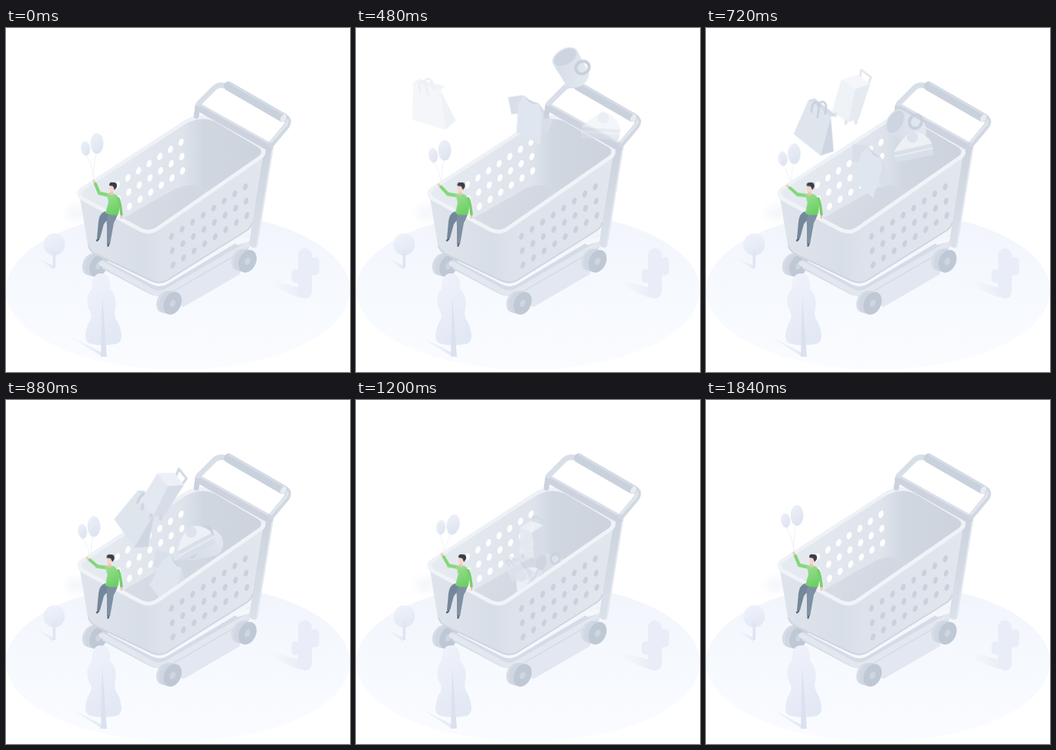
An HTML page for the animation above (1920 ms loop, 450 by 450 pixels).

```html
<!DOCTYPE html>
<html lang="en">
<head>
<meta charset="utf-8">
<title>Shopping cart</title>
<style>
html, body { margin: 0; width: 100%; height: 100%; overflow: hidden; background: #fff; }
svg { display: block; width: 100vw; height: 100vh; }

/* The picture advances once every 80 ms: 24 poses per loop. */
.move { animation: 1920ms infinite; }
.item { opacity: 0; }
#shirt { animation-name: shirt; }
#mug { animation-name: mug; }
#cake { animation-name: cake; }
#bag { animation-name: bag; }
#case { animation-name: case; }
#balloons { animation-name: balloons; transform-origin: 119px 151px; }
#torso { animation-name: lean; transform-origin: 140px 244px; }
#forearm { animation-name: forearm; transform-origin: 122px 216px; }

@keyframes shirt {
  0% { opacity: 0; transform: translate(266px, 36px) rotate(-16deg); animation-timing-function: steps(1); }
  4.166% { opacity: 0; transform: translate(266px, 36px) rotate(-16deg); animation-timing-function: steps(3); }
  16.666% { opacity: .85; transform: translate(245px, 83px) rotate(-6deg); animation-timing-function: steps(2); }
  25% { opacity: 1; transform: translate(227px, 120px) rotate(4deg); animation-timing-function: steps(2); }
  33.333% { opacity: 1; transform: translate(214px, 164px) rotate(12deg); animation-timing-function: steps(3); }
  45.833% { opacity: .95; transform: translate(210px, 234px) rotate(28deg); animation-timing-function: steps(4); }
  62.5%, 100% { opacity: 0; transform: translate(202px, 262px) rotate(34deg) scale(.7); }
}
@keyframes mug {
  0% { opacity: 0; transform: translate(338px, -34px) rotate(0deg); animation-timing-function: steps(2); }
  8.333% { opacity: .5; transform: translate(338px, -34px) rotate(0deg); animation-timing-function: steps(2); }
  16.666% { opacity: .65; transform: translate(312px, 14px) rotate(-14deg); animation-timing-function: steps(2); }
  25% { opacity: 1; transform: translate(282px, 53px) rotate(-30deg); animation-timing-function: steps(2); }
  33.333% { opacity: 1; transform: translate(265px, 102px) rotate(-42deg); animation-timing-function: steps(3); }
  45.833% { opacity: 1; transform: translate(258px, 189px) rotate(-100deg); animation-timing-function: steps(4); }
  62.5% { opacity: .75; transform: translate(254px, 216px) rotate(-76deg) scale(.75); animation-timing-function: steps(3); }
  75%, 100% { opacity: 0; transform: translate(250px, 236px) rotate(-70deg) scale(.6); }
}
@keyframes cake {
  0% { opacity: 0; transform: translate(366px, 152px) rotate(12deg); animation-timing-function: steps(3); }
  12.5% { opacity: 0; transform: translate(366px, 152px) rotate(12deg); animation-timing-function: steps(1); }
  16.666% { opacity: .12; transform: translate(349px, 143px) rotate(10deg); animation-timing-function: steps(2); }
  25% { opacity: .6; transform: translate(321px, 129px) rotate(8deg); animation-timing-function: steps(2); }
  33.333% { opacity: 1; transform: translate(283px, 140px) rotate(0deg); animation-timing-function: steps(3); }
  45.833% { opacity: 1; transform: translate(246px, 184px) rotate(-24deg); animation-timing-function: steps(4); }
  62.5% { opacity: .9; transform: translate(224px, 238px) rotate(-52deg) scale(.9); animation-timing-function: steps(4); }
  79.166%, 100% { opacity: 0; transform: translate(218px, 262px) rotate(-60deg) scale(.7); }
}
@keyframes bag {
  0% { opacity: 0; transform: translate(82px, 92px) rotate(-20deg); animation-timing-function: steps(5); }
  20.833% { opacity: 0; transform: translate(82px, 92px) rotate(-20deg); animation-timing-function: steps(1); }
  25% { opacity: .35; transform: translate(97px, 102px) rotate(-14deg); animation-timing-function: steps(2); }
  33.333% { opacity: 1; transform: translate(129px, 118px); animation-timing-function: steps(3); }
  45.833% { opacity: 1; transform: translate(171px, 156px) rotate(24deg); animation-timing-function: steps(4); }
  62.5% { opacity: .6; transform: translate(211px, 223px) rotate(-38deg) scale(.55); animation-timing-function: steps(4); }
  79.166%, 100% { opacity: 0; transform: translate(214px, 250px) rotate(-44deg) scale(.5); }
}
@keyframes case {
  0% { opacity: 0; transform: translate(170px, 58px) rotate(-8deg); animation-timing-function: steps(7); }
  29.166% { opacity: 0; transform: translate(170px, 58px) rotate(-8deg); animation-timing-function: steps(1); }
  33.333% { opacity: .4; transform: translate(183px, 80px); animation-timing-function: steps(3); }
  45.833% { opacity: 1; transform: translate(203px, 126px) rotate(22deg); animation-timing-function: steps(4); }
  62.5% { opacity: .9; transform: translate(230px, 186px) rotate(-8deg) scale(.8); animation-timing-function: steps(5); }
  83.333%, 100% { opacity: 0; transform: translate(226px, 238px) rotate(-22deg) scale(.6); }
}
@keyframes balloons {
  0% { transform: translate(0, 0); animation-timing-function: steps(4); }
  16.666% { transform: translate(-2px, 4px); animation-timing-function: steps(2); }
  25% { transform: translate(-3px, 9px); animation-timing-function: steps(2); }
  33.333% { transform: translate(-3.5px, 13px); animation-timing-function: steps(3); }
  45.833% { transform: translate(-4px, 14.5px); animation-timing-function: steps(4); }
  62.5% { transform: translate(8px, 12px) rotate(11deg); animation-timing-function: steps(6); }
  87.5% { transform: translate(1px, 1px) rotate(1deg); animation-timing-function: steps(2); }
  95.833%, 100% { transform: translate(0, 0); }
}
@keyframes lean {
  0% { transform: rotate(0deg); animation-timing-function: steps(8); }
  33.333% { transform: rotate(-5deg); animation-timing-function: steps(3); }
  45.833% { transform: rotate(-5deg); animation-timing-function: steps(4); }
  62.5% { transform: rotate(-1.500deg); animation-timing-function: steps(6); }
  87.5%, 100% { transform: rotate(0deg); }
}
@keyframes forearm {
  0% { transform: rotate(0deg); animation-timing-function: steps(4); }
  16.666% { transform: rotate(-9deg); animation-timing-function: steps(2); }
  25% { transform: rotate(-17deg); animation-timing-function: steps(2); }
  33.333% { transform: rotate(-21deg); animation-timing-function: steps(3); }
  45.833% { transform: rotate(-22deg); animation-timing-function: steps(4); }
  62.5% { transform: rotate(-6deg); animation-timing-function: steps(6); }
  87.5% { transform: rotate(-1deg); animation-timing-function: steps(2); }
  95.833%, 100% { transform: rotate(0deg); }
}
</style>
</head>
<body>
<svg viewBox="0 0 450 450" fill="none" stroke-linecap="round" stroke-linejoin="round">
  <defs>
    <linearGradient id="ground" x2="0" y2="1">
      <stop stop-color="#f1f4fb"/><stop offset=".5" stop-color="#f6f9fe"/><stop offset="1" stop-color="#fafcff"/>
    </linearGradient>
    <linearGradient id="leaf" x1="0" x2=".4" y2="1">
      <stop stop-color="#f0f3fb"/><stop offset="1" stop-color="#e3e8f5"/>
    </linearGradient>
    <linearGradient id="inside" gradientUnits="userSpaceOnUse" x1="97" x2="338">
      <stop stop-color="#e6ebf2"/><stop offset=".55" stop-color="#dfe4ec"/>
      <stop offset=".67" stop-color="#d0d7e1"/><stop offset="1" stop-color="#ccd3dd"/>
    </linearGradient>
    <linearGradient id="floor" x1="0" x2="1" y2=".3">
      <stop stop-color="#dadfe7"/><stop offset=".6" stop-color="#d2d8e1"/><stop offset="1" stop-color="#d3dae3"/>
    </linearGradient>
    <linearGradient id="outside" gradientUnits="userSpaceOnUse" x1="97" x2="338">
      <stop stop-color="#dfe4ec"/><stop offset=".33" stop-color="#d8dee7"/>
      <stop offset=".46" stop-color="#dde2eb"/><stop offset="1" stop-color="#e2e7ee"/>
    </linearGradient>
    <linearGradient id="post" x2="0" y2="1">
      <stop stop-color="#ccd3de"/><stop offset="1" stop-color="#dbe1ea"/>
    </linearGradient>
    <linearGradient id="soft" x2="1" y2="1">
      <stop stop-color="#d5dce7"/><stop offset="1" stop-color="#e6ebf2"/>
    </linearGradient>
    <linearGradient id="balloon" x2=".5" y2="1">
      <stop stop-color="#eef1f9"/><stop offset="1" stop-color="#dee4f1"/>
    </linearGradient>
    <linearGradient id="shade" x1="1" x2="0">
      <stop stop-color="#e4e9f4"/><stop offset="1" stop-color="#f5f8fd"/>
    </linearGradient>
    <linearGradient id="sweater" x2=".4" y2="1">
      <stop stop-color="#a0e098"/><stop offset="1" stop-color="#6dd064"/>
    </linearGradient>
    <filter id="blur" x="-50%" y="-50%" width="200%" height="200%"><feGaussianBlur stdDeviation="6"/></filter>
    <path id="rim" d="M96 217Q95 213 102 209L236 122Q256 112 274 120L330 153Q341 160 333 169L199 262Q188 270 176 264L101 224Q97 222 96 217Z"/>
    <clipPath id="basket"><use href="#rim"/></clipPath>
    <g id="wheel">
      <g transform="rotate(24)">
        <ellipse cx="-5" cy="1" rx="10.500" ry="15" fill="#d7dde7"/>
        <ellipse cx="-1" cy="0" rx="11" ry="15.500" fill="#d0d7e2"/>
        <ellipse cx="5" cy="-1" rx="11" ry="15.500" fill="#bfc8d5"/>
        <ellipse cx="5" cy="-1" rx="3.500" ry="5" fill="#cfd6e0"/>
      </g>
    </g>
  </defs>

  <ellipse cx="225" cy="343" rx="225" ry="104" fill="url(#ground)"/>
  <ellipse cx="92" cy="242" rx="13" ry="9" fill="#f3f5fa" filter="url(#blur)"/>

  <!-- plants behind -->
  <path d="M38 299L62 311V316Z" fill="url(#shade)"/>
  <ellipse cx="63" cy="283" rx="14" ry="14.500" fill="url(#leaf)"/>
  <path d="M63 291V314" stroke="#dfe5f1" stroke-width="3.500" stroke-linecap="butt"/>
  <path d="M350 330L384 340V353L350 338Z" fill="url(#shade)" opacity=".7"/>
  <g stroke="#e9edf7">
    <path d="M391 297V345" stroke-width="18"/>
    <path d="M379 321V328H391M404 305V318H392" stroke-width="11"/>
  </g>

  <!-- undercarriage -->
  <path d="M205 348L312 288 306 322 232 365Z" fill="#e2e7f1"/>
  <use href="#wheel" transform="translate(116 310)"/>
  <path d="M126 302L190 335Q201 341 211 335L318 271V288L214 348Q201 354 188 348L126 315Z" fill="#d5dce6"/>
  <path d="M125 308L190 344Q201 350 211 344L318 282" stroke="#e3e8f0" stroke-width="7"/>
  <path d="M295 279L318 272V279L303 284Z" fill="#f5f7fb"/>
  <use href="#wheel" transform="translate(213 359)"/>
  <use href="#wheel" transform="translate(311 304)"/>
  <path d="M335 162L350 154 329 284Q326 291 318 284Z" fill="url(#post)"/>
  <path d="M349 156L328 284" stroke="#e3e8ef" stroke-width="2"/>

  <!-- basket interior -->
  <use href="#rim" fill="url(#inside)"/>
  <g clip-path="url(#basket)">
    <path d="M146 253L222 210Q241 202 258 209L300 231 190 290Z" fill="url(#floor)"/>
    <g id="backHoles" fill="#fff"></g>
  </g>
  <use href="#rim" stroke="#eef1f6" stroke-width="5"/>

  <g id="shirt" class="move item">
    <g transform="skewY(24)">
      <path d="M-10-27Q0-20 10-27L30-14 24 5 16 0V25H-16V0L-24 5-30-14Z" fill="#e0e6ef"/>
      <path d="M-10-27L-30-14-24 5-16 0V-13ZM10-27L30-14 24 5 16 0V-13Z" fill="#d8dfe9"/>
      <path d="M-10-27Q0-18 10-27Q0-23-10-27Z" fill="#ccd4e0"/>
    </g>
  </g>

  <!-- handle -->
  <path d="M252 104L344 156" stroke="#ccd3de" stroke-width="10"/>
  <path d="M252 99L345 151" stroke="#dce1e9" stroke-width="3"/>
  <path d="M251 102L249 115" stroke="#cbd2dd" stroke-width="7"/>
  <path d="M252 99L273 78Q279 73 288 76" stroke="#d9dfe8" stroke-width="7"/>
  <path d="M364 116Q372 120 367 128L347 152" stroke="#d1d8e2" stroke-width="8"/>
  <path d="M366 119Q370 122 366 127L347 149" stroke="#e2e7ee" stroke-width="3"/>
  <path d="M291 76L362 117" stroke="#c9d1dc" stroke-width="12"/>
  <path d="M293 72L364 113" stroke="#d6dce6" stroke-width="3"/>
  <ellipse cx="363" cy="118" rx="3.500" ry="5.500" transform="rotate(28 363 118)" fill="#e8ecf2"/>

  <g id="mug" class="move item">
    <path d="M-18-17L-17 17Q-10 26 0 26T17 17L18-17Z" fill="url(#soft)"/>
    <ellipse cy="-17" rx="18" ry="11" fill="#dce2eb"/>
    <ellipse cy="-17" rx="16" ry="9.500" fill="#cdd5e0"/>
    <ellipse cx="13" cy="6" rx="9" ry="8" stroke="#c8d0dc" stroke-width="4"/>
  </g>

  <g id="cake" class="move item">
    <path d="M-26 4L25 0V15L-24 18Z" fill="#d8dfe9"/>
    <path d="M-26 4Q-14-12 1-19 20-16 25 0Z" fill="#edf1f6"/>
    <path d="M-25 10L25 6" stroke="#e9edf3" stroke-width="2"/>
    <circle cx="1" cy="-12" r="7.500" fill="#dde3ec"/>
  </g>

  <g id="bag" class="move item">
    <path d="M-14-35L18-17 12 35-27 12Z" fill="#dfe5ed"/>
    <path d="M18-17L28 27 12 35Z" fill="#ced6e1"/>
    <path d="M-14-35L-6-38 25-20 18-17Z" fill="#d6dde7"/>
    <path d="M-8-20V-28Q-5-37 1-32V-14M-1-30Q5-40 10-31V-20" stroke="#c8d0dc" stroke-width="2.500"/>
  </g>

  <g id="case" class="move item">
    <path d="M8-25V-42L22-34 17-15" stroke="#d0d7e1" stroke-width="3"/>
    <path d="M-16-26L3-16 0 28-23 17Z" fill="#e4e9f1"/>
    <path d="M3-16L22-25 13 23 0 28Z" fill="#d6dde8"/>
    <path d="M-16-26L4-35 22-25 3-16Z" fill="#edf0f6"/>
    <path d="M-18 19V22M-3 27V30M10 25V28" stroke="#d0d7e2" stroke-width="4"/>
  </g>

  <!-- basket front -->
  <path d="M96 218Q97 222 101 224L176 264Q188 270 199 262L333 169Q337 166 337 162L322 256Q320 263 313 267L211 331Q201 337 189 331L118 297Q109 292 107 284Z" fill="url(#outside)"/>
  <path d="M108 285Q110 292 118 296L189 330Q201 336 211 330L313 266Q320 262 322 255" stroke="#cfd6e0" stroke-width="2"/>
  <path d="M96 217Q97 222 101 224L176 264Q188 270 199 262L333 169Q337 166 337 162" stroke="#f0f3f7" stroke-width="5"/>
  <g id="frontHoles" fill="#c9d1dc"></g>

  <!-- tree in front -->
  <path d="M80 401L126 425V430Z" fill="url(#shade)"/>
  <path d="M124 321Q137 321 136 341 146 351 143 367 140 377 147 386 156 409 145 413 127 417 110 413 99 409 108 386 115 377 108 367 103 352 112 341 112 321 124 321Z" fill="url(#leaf)"/>
  <path d="M126 351L124 430H132Z" fill="#dbe1ee"/>

  <!-- rider -->
  <g id="balloons" class="move">
    <path d="M105 167Q113 177 115 200M118 164Q114 180 115 200" stroke="#eef1f6" stroke-width="1"/>
    <ellipse cx="104" cy="157.500" rx="6" ry="9.500" transform="rotate(-8 104 157)" fill="url(#balloon)"/>
    <ellipse cx="119" cy="151" rx="8.500" ry="13.500" fill="url(#balloon)"/>
  </g>
  <path d="M129 240L146 244Q142 250 136 250 128 253 127 260L123 275H119L121 253Q122 243 129 240Z" fill="#74869a"/>
  <path d="M134 243L146 244Q144 250 141 255L136 283H132L132 259Q131 248 134 243Z" fill="#8091a4"/>
  <path d="M121 276L119 278M134 283L133.500 285" stroke="#5d6c7e" stroke-width="2.500"/>
  <g id="torso" class="move">
    <g id="forearm" class="move">
      <path d="M116 203L115 200" stroke="#f5c9b5" stroke-width="3"/>
      <path d="M122 216L117 204" stroke="#7fd675" stroke-width="4"/>
    </g>
    <path d="M135 219L122 216" stroke="#86d87c" stroke-width="4.500"/>
    <path d="M132 217Q138 215 144 218 149 222 149 232L147 244Q137 246 130 242L134 228Z" fill="url(#sweater)"/>
    <path d="M138 212V217" stroke="#f2c2ad" stroke-width="4"/>
    <ellipse cx="138" cy="210" rx="3" ry="4.500" fill="#f9d5c4"/>
    <path d="M135 206Q135 201 140 202 146 201 145 208L142 212 140 207Z" fill="#3a3e4a"/>
  </g>
  <path d="M147 223Q150 231 151 244" stroke="#74cf6a" stroke-width="3.500"/>
  <path d="M151 247V248" stroke="#f5c9b5" stroke-width="3"/>
</svg>
<script>
const NS = "http://www.w3.org/2000/svg";

function holes(id, rows, cols, place, rx, ry) {
  const group = document.getElementById(id);
  for (let r = 0; r < rows; r++) {
    for (let c = 0; c < cols; c++) {
      const [x, y] = place(r, c);
      const hole = document.createElementNS(NS, "ellipse");
      hole.setAttribute("rx", rx);
      hole.setAttribute("ry", ry);
      hole.setAttribute("transform", `translate(${x} ${y}) rotate(20)`);
      group.append(hole);
    }
  }
}

holes("backHoles", 3, 7, (r, c) => [229 + r - 13.9 * c, 149.5 + 18.7 * r + 9.3 * c], 3.1, 5);
holes("frontHoles", 3, 8, (r, c) => [216.5 + r + 13.8 * c, 272.5 + 18.7 * r - 9.25 * c], 2.8, 4.6);
</script>
</body>
</html>
```
